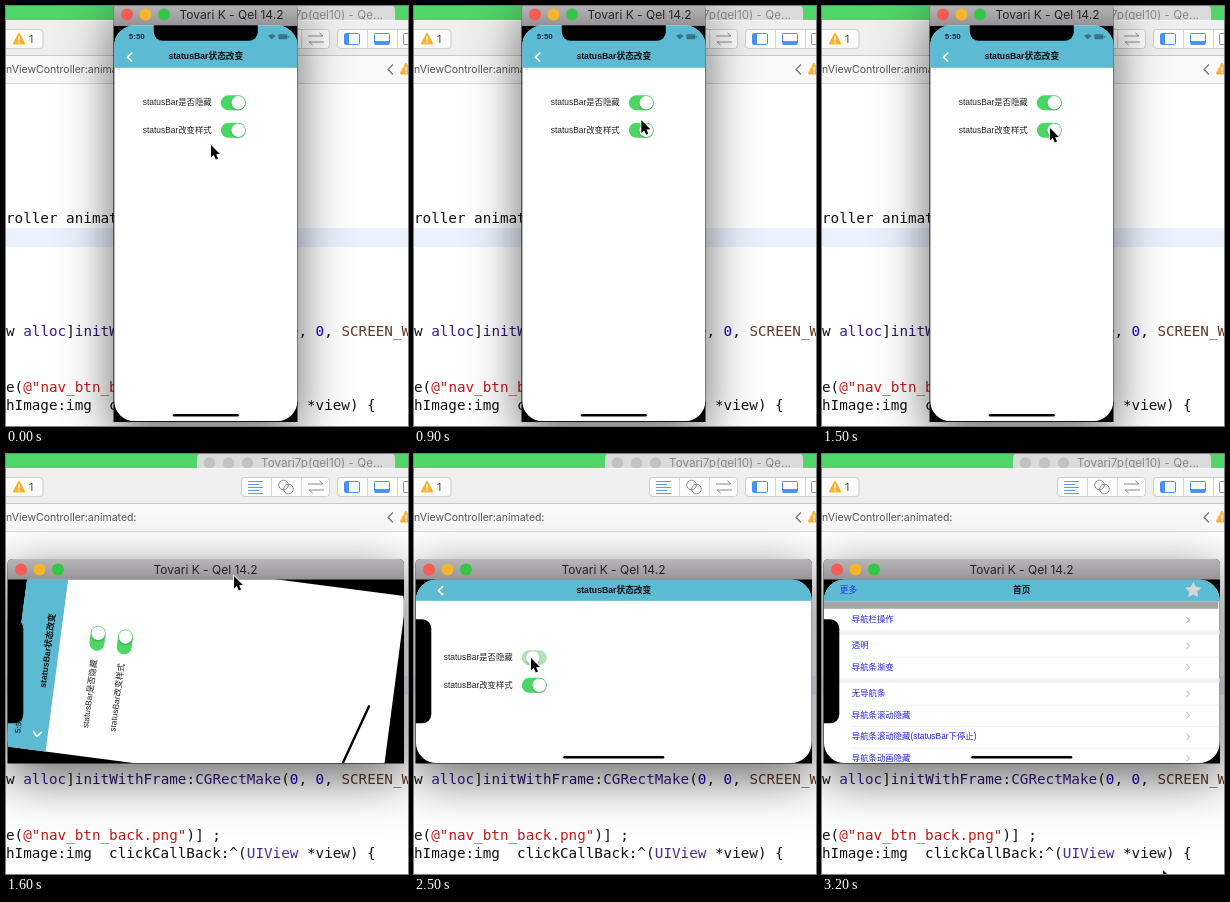
Write an HTML page with a canvas that moves like this. It is 402 px wide and 420 px high and loops after 3.3 s.

```html
<!DOCTYPE html>
<html lang="zh">
<head>
<meta charset="utf-8">
<title>statusBar</title>
<style>
html, body { margin: 0; width: 402px; height: 420px; overflow: hidden; background: #fff; }
canvas { display: block; }
</style>
</head>
<body>
<canvas id="stage" width="402" height="420"></canvas>
<script>
const c = document.getElementById('stage').getContext('2d');
const LOOP = 3300, STEP = 100, TURN = 1545, TURN_TIME = 200, POP = 2800, POP_TIME = 150;
const SANS = '"Liberation Sans", "Noto Sans CJK SC", "Noto Sans CJK", sans-serif';
const UI = 'Inter, sans-serif', MONO = '"DejaVu Sans Mono", monospace';
const GREEN = [76, 215, 100], OFF = [232, 232, 232], TEAL = '#5cbad2', BLUE = '#2222dc';

const mix = (a, b, k) => a + (b - a) * k;
const clamp = v => Math.max(0, Math.min(1, v));
const easeInOut = u => u < .5 ? 4 * u ** 3 : 1 - (2 - 2 * u) ** 3 / 2;

// Linear keyframes: [time, ...values]
function track(t, keys) {
  const i = keys.findIndex(k => k[0] > t);
  if (i === 0) return keys[0].slice(1);
  if (i < 0) return keys[keys.length - 1].slice(1);
  const a = keys[i - 1], b = keys[i], u = (t - a[0]) / (b[0] - a[0]);
  return a.slice(1).map((v, n) => mix(v, b[n + 1], u));
}

const CURSOR = [[0, 205, 139], [300, 226, 99], [800, 226, 99], [950, 228, 122], [1700, 228, 122],
  [2000, 45, 152], [2200, 117, 204], [2550, 117, 204], [2750, 27, 136], [2800, 27, 136],
  [3000, 318, 398], [3200, 341, 416]];
const HIDE = [[300, 1], [400, .3], [500, 0], [600, 0], [700, .6], [800, 1],
  [2200, 1], [2300, .3], [2400, 0], [2500, .35], [2600, 1]];
const STYLE = [[900, 1], [1000, .4], [1100, 0], [1200, .5], [1300, 1]];

function rect(x, y, w, h, fill) { c.fillStyle = fill; c.fillRect(x, y, w, h); }

function box(x, y, w, h, r, fill, stroke) {
  c.beginPath(); c.roundRect(x, y, w, h, r);
  if (fill) { c.fillStyle = fill; c.fill(); }
  if (stroke) { c.strokeStyle = stroke; c.lineWidth = 1; c.stroke(); }
}

function dot(x, y, r, fill) { c.beginPath(); c.arc(x, y, r, 0, 7); c.fillStyle = fill; c.fill(); }

function line(points, color, width = 1) {
  c.beginPath();
  points.forEach(p => c.lineTo(...p));
  c.strokeStyle = color; c.lineWidth = width; c.stroke();
}

function text(s, x, y, size, color, align = 'left', font = SANS, weight = 400) {
  c.font = `${weight} ${size}px ${font}`;
  c.textAlign = align; c.textBaseline = 'middle'; c.fillStyle = color;
  c.fillText(s, x, y);
}

function code(y, parts) {
  let col = 0;
  c.textBaseline = 'alphabetic';
  for (const [s, color] of parts) {
    c.font = `14.28px ${MONO}`; c.textAlign = 'left'; c.fillStyle = color;
    c.fillText(s, col * 8.6, y);
    col += s.length;
  }
}

function warning(x, y) {
  c.beginPath(); c.moveTo(x, y - 5); c.lineTo(x + 5, y + 4.5); c.lineTo(x - 5, y + 4.5); c.closePath();
  c.fillStyle = c.strokeStyle = '#f5b32e'; c.lineWidth = 2; c.lineJoin = 'round'; c.fill(); c.stroke();
  rect(x - .7, y - 2.5, 1.4, 4, '#fff'); rect(x - .7, y + 2.7, 1.4, 1.4, '#fff');
}

function editor() {
  rect(0, 0, 402, 420, '#fff');
  rect(0, 0, 402, 15, '#50d568');
  box(191, -1, 198, 24, 5, '#dcdbdc');
  [203.5, 222.5, 241.5].forEach(x => dot(x, 9, 5.7, '#c3c2c3'));
  text('Tovari7p(qel10) - Qe...', 255, 9.5, 11.7, '#888', 'left', UI);

  rect(0, 14, 402, 36, '#f0eff0'); rect(0, 14, 402, 1, '#fafafa');
  rect(0, 49, 402, 1, '#c8c8c8');
  rect(0, 50, 402, 27, '#f9f9f9'); rect(0, 77, 402, 1, '#d9d9d9');
  box(-8, 23.5, 45, 19, 3, '#fcfcfc', '#d0d0d0');
  warning(13, 33); text('1', 23, 33.5, 10.5, '#444', 'left', UI);

  box(235.5, 23.5, 88, 19, 3, '#fdfdfd', '#cdcdcd');
  box(331.5, 23.5, 90, 19, 3, '#fdfdfd', '#cdcdcd');
  [265.5, 295.5, 361.5, 391.5].forEach(x => line([[x, 24], [x, 42]], '#d5d5d5'));
  [15, 11, 15, 11, 15].forEach((w, i) => rect(242, 27 + i * 3, w, 1, '#5a9af2'));
  c.strokeStyle = '#8a8a8a'; c.lineWidth = 1;
  [[277.5, 31], [282.5, 35]].forEach(([x, y]) => { c.beginPath(); c.arc(x, y, 4.8, 0, 7); c.stroke(); });
  line([[302, 30], [317, 30], [313.5, 27]], '#8a8a8a');
  line([[318, 36], [303, 36], [306.5, 39]], '#8a8a8a');
  box(338.5, 27.5, 15, 11, 1, null, '#4a90f0'); rect(339, 28, 4, 10, '#4a90f0');
  box(368.5, 27.5, 15, 11, 1, null, '#4a90f0'); rect(369, 35, 14, 3, '#4a90f0');
  box(397.5, 27.5, 15, 11, 1, null, '#8a8a8a');

  text('nViewController:animated:', 0, 63.5, 10.5, '#555', 'left', UI);
  line([[387, 58.5], [382, 63.5], [387, 68.5]], '#777', 1.2);
  warning(400, 63);

  rect(0, 222, 402, 19, '#eaf1fd');
  code(217, [['roller animated:', '#111']]);
  code(329.5, [['w ', '#111'], ['alloc', '#3b1a8c'], [']', '#111'], ['initWithFrame', '#2e1270'], [':', '#111'],
    ['CGRectMake', '#3b1a8c'], ['(', '#111'], ['0', '#1c00cf'], [', ', '#111'], ['0', '#1c00cf'],
    [', ', '#111'], ['SCREEN_W', '#643820']]);
  code(385.5, [['e(', '#111'], ['@"nav_btn_back.png"', '#c41a16'], [')] ;', '#111']]);
  code(404, [['hImage:img  clickCallBack:^(', '#111'], ['UIView', '#4b2a92'], [' *view) {', '#111']]);
}

function frameWindow(wide) {
  const [x, y, w, h] = wide ? [1.5, 105, 396.5, 204.5] : [107.5, -2, 184, 418];
  c.save();
  c.shadowColor = 'rgba(0,0,0,.6)'; c.shadowBlur = 50; c.shadowOffsetY = 14;
  box(x, y, w, h, [5, 5, 0, 0], '#000');
  c.restore();
  const g = c.createLinearGradient(0, y, 0, y + 21);
  g.addColorStop(0, '#b9b6b9'); g.addColorStop(1, '#969396');
  box(x, y, w, wide ? 20.5 : 22, [5, 5, 0, 0], g);
  const mid = wide ? 115.5 : 8.5;
  ['#f55c55', '#f4b62f', '#35c648'].forEach((k, i) => dot(x + 13.5 + i * 18.5, mid, 6, k));
  text('Tovari K - Qel 14.2', wide ? 199.5 : 225.5, mid + 1, 12, '#222', 'center', UI);
}

function toggle(x, y, on) {
  const col = GREEN.map((g, i) => mix(OFF[i], g, on));
  box(x - 12.5, y - 7.5, 25, 15, 7.5, `rgb(${col})`);
  c.globalAlpha = clamp(1 - 3 * on);
  box(x - 11.8, y - 6.8, 23.6, 13.6, 6.8, '#fff');
  c.globalAlpha = 1;
  c.save();
  c.shadowColor = 'rgba(0,0,0,.3)'; c.shadowBlur = 2; c.shadowOffsetY = 1;
  dot(mix(x - 5, x + 5, on), y, 6.8, '#fff');
  c.restore();
}

function statusBar(p, color, alpha) {
  const y = mix(-187, -81, p), right = mix(66, 173, p);
  c.globalAlpha = alpha;
  text('5:50', mix(-69, -176, p), y, 8, color, 'center', SANS, 700);
  c.globalAlpha = alpha * .5;
  c.beginPath(); c.moveTo(right, y + 3); c.arc(right, y + 3, 5, -2.4, -.74); c.fillStyle = color; c.fill();
  box(right + 6.5, y - 2, 9, 5, 1, color);
  rect(right + 16, y - .5, 1, 2, color);
  c.globalAlpha = 1;
}

// Settings page, centred on the screen; p goes from upright (0) to sideways (1).
function settings(p, hide, style) {
  const w = mix(183, 396, p), h = mix(396, 184, p), top = -h / 2;
  const row = mix(-120.5, -13.5, p), title = mix(-166.2, -80.7, p);
  rect(-w / 2, top, w, h, '#fff');
  rect(-w / 2, top, w, mix(42.5, 21.5, p), TEAL);
  text('statusBar状态改变', 0, title, 8.7, '#111', 'center', SANS, 700);
  const x = mix(-76, -173, p);
  line([[x + 2.5, title - 4.5], [x - 2.5, title], [x + 2.5, title + 4.5]], '#fff', 1.5);
  [['statusBar是否隐藏', hide], ['statusBar改变样式', style]].forEach(([s, on], i) => {
    const y = row + i * 27.5;
    text(s, mix(-63, -170, p), y, 8.4, '#222');
    toggle(mix(27.5, -79.5, p), y, on);
  });
  if (p < 1) statusBar(p, style > .4 ? '#15303a' : '#fff', hide * (1 - p));
}

function star(x, y, r) {
  c.beginPath();
  for (let i = 0; i < 10; i++) {
    const a = i * Math.PI / 5 - Math.PI / 2, d = i % 2 ? r * .5 : r;
    c.lineTo(x + d * Math.cos(a), y + d * Math.sin(a));
  }
  c.closePath(); c.fillStyle = '#d3d6d8'; c.fill();
}

function home() {
  rect(-198, -92, 396, 184, '#fff');
  rect(-198, -92, 396, 22, TEAL);
  text('更多', -182, -80.7, 8.6, '#1c35d8');
  text('首页', 0, -80.7, 8.7, '#111', 'center', SANS, 700);
  star(171.5, -81, 8.5);
  rect(-198, -70, 394.5, 7.5, '#a4a4a4');
  [-41, 7].forEach(y => rect(-198, y, 396, 4.5, '#f1f1f3'));
  [-14.5, 33.5, 55, 76.5].forEach(y => rect(-170, y, 368, .6, '#e3e3e5'));
  [['导航栏操作', -51.5], ['透明', -25.5], ['导航条渐变', -4], ['无导航条', 22.5], ['导航条滚动隐藏', 44],
    ['导航条滚动隐藏(statusBar下停止)', 65.5], ['导航条动画隐藏', 87]].forEach(([s, y]) => {
    text(s, -170, y, 8.4, BLUE);
    line([[164.5, y - 3], [167.8, y], [164.5, y + 3]], '#c4c4c8', 1.1);
  });
}

function phone(t, wide) {
  const turn = clamp((t - TURN) / TURN_TIME), p = easeInOut(turn), tilt = wide ? -Math.PI / 2 : 0;
  const pop = clamp((t - POP) / POP_TIME), slide = 1 - (1 - pop) ** 2;
  c.save();
  c.translate(199.8, 217.3);
  c.rotate(tilt);
  c.beginPath(); c.roundRect(-91.8, -198, 183.6, 396, 21); c.clip();
  c.rotate(-tilt);

  c.save();
  c.rotate(tilt * (1 - p));
  if (pop > 0) { c.save(); c.translate(-120 * (1 - slide), 0); home(); c.restore(); }
  if (pop < 1) { c.translate(396 * slide, 0); settings(p, track(t, HIDE)[0], track(t, STYLE)[0]); }
  c.restore();

  // The home bar turns ahead of the page.
  c.save();
  c.rotate(tilt * (1 - turn));
  const len = mix(66, 101, turn);
  box(-len / 2, mix(190.8, 84.8, turn), len, 2.4, 1.2, '#000');
  c.restore();

  c.rotate(tilt);
  box(-52, -210, 104, 27.5, 9, '#000');
  c.restore();
}

function cursor(t) {
  c.save();
  c.translate(...track(t, CURSOR));
  c.scale(.9, .9);
  c.beginPath();
  [[0, 0], [0, 14], [3.1, 11.2], [5.3, 16], [7.8, 15], [5.7, 10.2], [10, 10]].forEach(q => c.lineTo(...q));
  c.closePath();
  c.lineJoin = 'miter'; c.lineWidth = 1.8; c.strokeStyle = '#fff'; c.stroke();
  c.fillStyle = '#000'; c.fill();
  c.restore();
}

function draw() {
  const t = Math.floor(performance.now() % LOOP / STEP) * STEP, wide = t >= TURN;
  editor();
  frameWindow(wide);
  phone(t, wide);
  cursor(t);
  requestAnimationFrame(draw);
}
draw();
</script>
</body>
</html>
```
